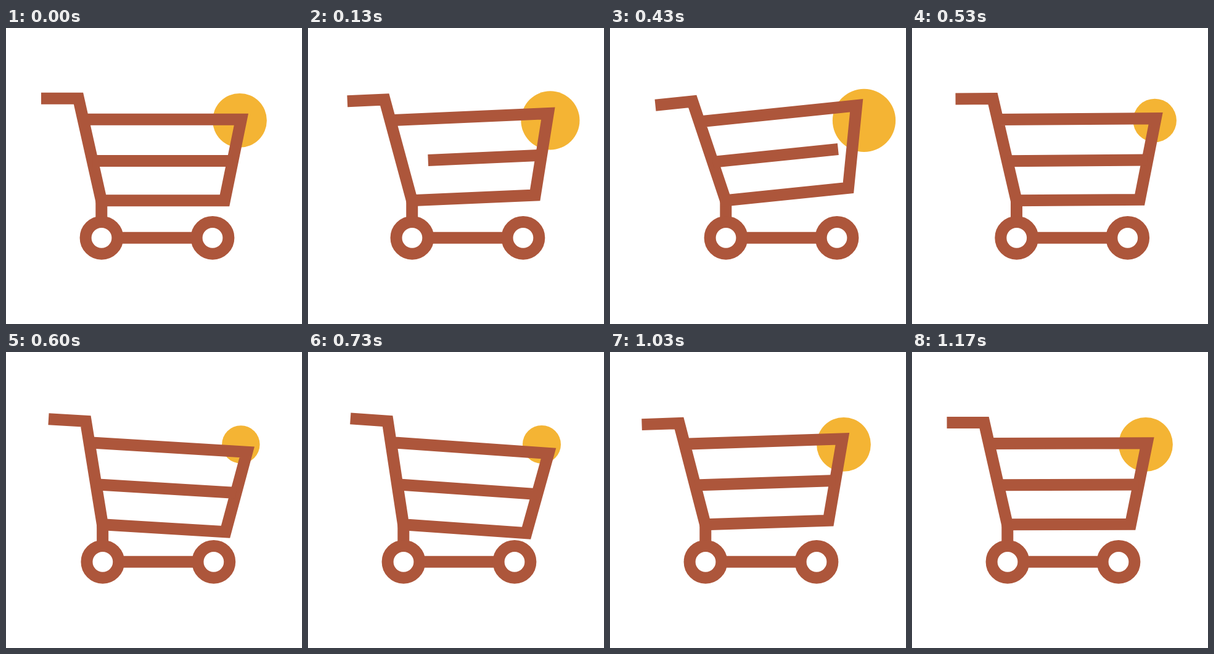
An HTML page for the animation above (1.2 s loop, 480x480 px).

```html
<!DOCTYPE html>
<html lang="en">
<head>
<meta charset="utf-8">
<title>Shopping cart</title>
<style>
  html, body { margin: 0; height: 100%; overflow: hidden; background: #fff; }
  svg { display: block; width: 100vw; height: 100vh; }
  .cart { fill: none; stroke: #ad563b; stroke-width: 19; }
</style>
</head>
<body>
<svg viewBox="0 0 480 480">
  <g id="scene">
    <circle id="sun" cx="379" cy="149.9" fill="#f4b434"/>
    <g class="cart">
      <path d="M154.8 280V312M182 340.3H308"/>
      <circle cx="155" cy="340.3" r="25.9"/>
      <circle cx="335" cy="340.3" r="25.9"/>
      <g id="basket">
        <path d="M57 114.3H117.5L154.6 279.8H354.5L381.4 148.3H125"/>
        <path id="bar"/>
      </g>
    </g>
  </g>
</svg>
<script>
const LOOP = 1200;
const BAR_LEFT = 140.2, BAR_RIGHT = 367.7, BAR_Y = 215.6;
const [scene, sun, basket, bar] =
  ['scene', 'sun', 'basket', 'bar'].map(id => document.getElementById(id));

function draw(now) {
  // The motion steps at 30 ticks per second.
  const tick = Math.floor((now % LOOP) * 0.03 + 0.101);

  // Smooth progress from 0 to 1 between two ticks.
  const ease = (from, to) => {
    const p = Math.min(1, Math.max(0, (tick - from) / (to - from)));
    return p * p * (3 - 2 * p);
  };
  const along = progress => BAR_LEFT + (BAR_RIGHT - BAR_LEFT) * progress;

  const forward = ease(0, 9), back = ease(12.6, 18.9);
  const shift = 33.4 * (forward - back);
  const tilt = -6 * forward + 10 * back - 6 * ease(24.2, 30.2) + 2 * ease(30.2, 36);
  const sunScale = 1 + 0.2 * forward - 0.5 * ease(12.1, 17.6) + 0.3 * ease(21.4, 28.2);

  scene.setAttribute('transform', `translate(${shift})`);
  basket.setAttribute('transform', `rotate(${tilt} 154.6 280)`);
  sun.setAttribute('r', 43.9 * sunScale);

  // The middle bar is wiped from the left, then drawn again behind the wipe.
  const wiped = along(ease(0.7, 12.5)), redrawn = along(ease(4.5, 15.1));
  bar.setAttribute('d',
    `M${BAR_LEFT} ${BAR_Y}H${redrawn}M${wiped} ${BAR_Y}H${BAR_RIGHT}`);
}

const start = performance.now();
function loop() {
  draw(performance.now() - start);
  requestAnimationFrame(loop);
}
loop();
</script>
</body>
</html>
```
